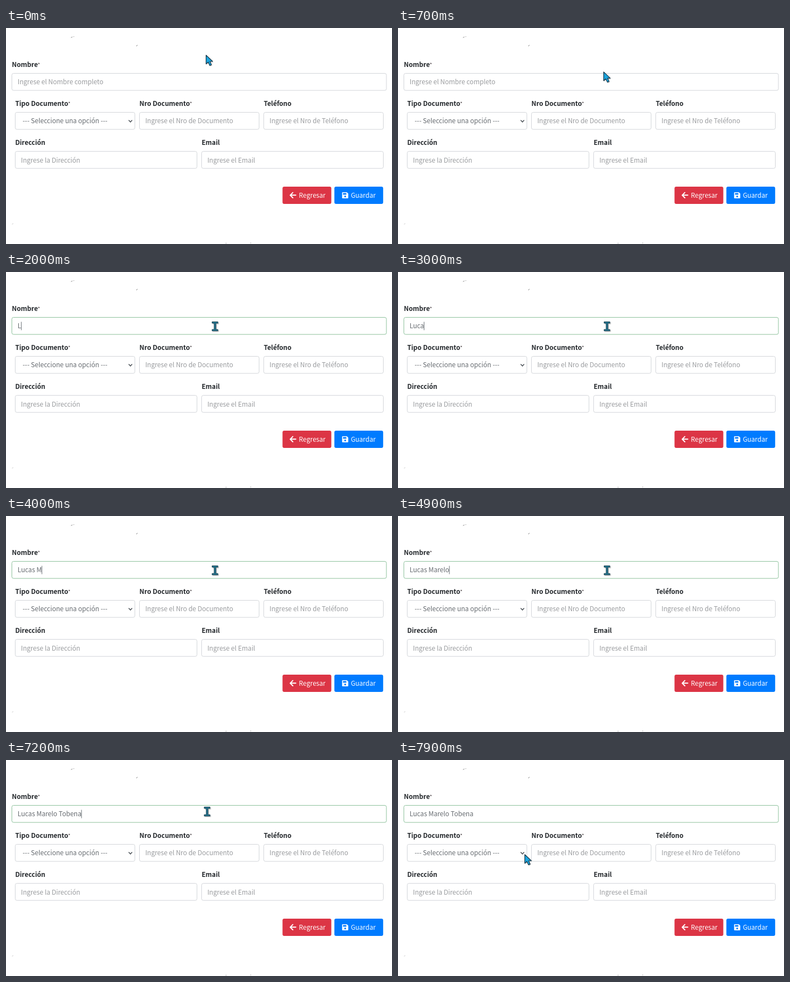
Recreate the animation shown at these times as an HTML page. Size 690 px wide and 388 px high, loop 8000 ms.

```html
<!DOCTYPE html>
<html lang="es">
<head>
<meta charset="utf-8">
<title>Formulario</title>
<style>
  html, body { margin: 0; width: 100%; height: 100%; overflow: hidden; background: #fff; }
  svg { display: block; width: 690px; height: 388px; }
  text { font: 400 11.65px "Noto Sans CJK JP", "Noto Sans CJK SC", "Noto Sans CJK", "Noto Sans", sans-serif; fill: #999b9e; white-space: pre; }
  .label { font-weight: 700; fill: #24282c; }
  .star { font-size: 7px; fill: #4a4245; }
  .value { fill: #666b70; }
  .button { font-weight: 500; fill: #fff; }
  .box { fill: #fff; stroke: #d3d6da; }
  .box.focused { fill: #fbfeff; stroke: #a9d0e8; }
  .box.valid { fill: #fff; stroke: #8fc29d; }
</style>
</head>
<body>
<svg id="stage" viewBox="0 0 690 388" xmlns="http://www.w3.org/2000/svg">
  <path d="M117 17.2l1.2-1.2M233.4 32.2l1.2-1.2" stroke="#555" stroke-linecap="round"/>
  <path d="M121 15.5h.6M11.5 352.3l.8-.8M393 386.5h.8M437 386h.8" stroke="#aaa" stroke-linecap="round"/>
  <g id="form"></g>

  <path d="M219.3 165.6l3.1 3.2 3.1-3.2" fill="none" stroke="#50565c" stroke-width="1.5"/>
  <text id="typed" class="value" x="20.8" y="101.4"></text>
  <path id="caret" d="M0 89.5V104.5" stroke="#6a7076"/>

  <path d="M518 300.3H508.5M512.7 295.6l-4.7 4.7 4.7 4.7" fill="none" stroke="#fff" stroke-width="1.9" stroke-linecap="round" stroke-linejoin="round"/>
  <path d="M602 295h7.2l2.6 2.6v7.2q0 1.2-1.2 1.2h-8.6q-1.2 0-1.2-1.2v-8.6q0-1.2 1.2-1.2z" fill="#fff"/>
  <path d="M602.4 296.5h6v2.9h-6z" fill="#007bff"/>
  <circle cx="606.3" cy="302.7" r="1.6" fill="#007bff"/>

  <g id="arrow" stroke-linejoin="round">
    <path d="M1.6 2V18.5L5.4 15 8.4 21 11.6 19.4 8.8 13.8H14z" fill="#555" opacity=".3"/>
    <path d="M.6 .8V16.6L4.4 13.2 7.3 19.4 10.3 18 7.5 12H12.4z" fill="#1ba5de" stroke="#1b3a4b" stroke-width="1.2"/>
  </g>
  <g id="beam" stroke-linejoin="round">
    <path d="M-4 -7H7V-3.6H3.4V6.6H7V10H-4V6.6H-.4V-3.6H-4z" fill="#555" opacity=".3"/>
    <path d="M-5.2 -8.2H5.2V-5.6H1.5V5.6H5.2V8.2H-5.2V5.6H-1.5V-5.6H-5.2z" fill="#1f7590" stroke="#1d4252" stroke-width="1"/>
  </g>
</svg>
<script>
const LOOP = 8000, STEP = 100, FOCUS = 900, BLINK = 500;
const LEFT = 16.5, WIDTH = 658, GAP = 8.3, HEIGHT = 30.6;

// each word is typed at its own steady pace
const WORDS = [
  { text: "Lucas ", start: 1700, pace: 360 },
  { text: "Marelo ", start: 3900, pace: 200 },
  { text: "Tobena", start: 5700, pace: 275 }
];
const NAME = WORDS.map(w => w.text).join("");
const KEYS = WORDS.flatMap(w => [...w.text].map((_, i) => w.start + i * w.pace));

const HOME = { x: 357, y: 48 };
const MOVES = [
  { start: 300, end: 1000, x: 373.6, y: 97.6 },
  { start: 7000, end: 7200, x: 359.5, y: 92.6 },
  { start: 7300, end: 7900, x: 226, y: 169 }
];

const $ = id => document.getElementById(id);
const ease = k => k * k * (3 - 2 * k);
const clamp = k => Math.min(1, Math.max(0, k));

function add(tag, attrs, text = "", parent = $("form")) {
  const el = document.createElementNS("http://www.w3.org/2000/svg", tag);
  for (const key in attrs) el.setAttribute(key, attrs[key]);
  el.textContent = text;
  return parent.appendChild(el);
}

function field(x, y, width, { label, hint, required, select }) {
  const title = add("text", { class: "label", x, y: y - 12 }, label);
  if (required) add("tspan", { class: "star", dy: -2 }, "*", title);
  const box = add("rect", { class: "box", x, y, width, height: HEIGHT, rx: 3 });
  const text = add("text", { class: select ? "value" : "", x: x + (select ? 13.3 : 10.3), y: y + 19.9 }, hint);
  return { box, text };
}

function row(y, fields) {
  const w = (WIDTH - GAP * (fields.length - 1)) / fields.length;
  fields.forEach((f, i) => field(LEFT + i * (w + GAP), y, w, f));
}

function button(x, color, label, textX) {
  add("rect", { x, y: 285, width: 87.2, height: 31, rx: 3, fill: color });
  add("text", { class: "button", x: textX, y: 304.8 }, label);
}

const name = field(10.5, 81.5, WIDTH + 11.5,
  { label: "Nombre", hint: "Ingrese el Nombre completo", required: true });
row(151.5, [
  { label: "Tipo Documento", hint: "--- Seleccione una opción ---", required: true, select: true },
  { label: "Nro Documento", hint: "Ingrese el Nro de Documento", required: true },
  { label: "Teléfono", hint: "Ingrese el Nro de Teléfono" }
]);
row(221.6, [
  { label: "Dirección", hint: "Ingrese la Dirección" },
  { label: "Email", hint: "Ingrese el Email" }
]);
button(494.3, "#dc3545", "Regresar", 523.6);
button(587, "#007bff", "Guardar", 616.4);

function pointer(t) {
  return MOVES.reduce((p, m) => {
    const k = ease(clamp((t - m.start) / (m.end - m.start)));
    return { x: p.x + (m.x - p.x) * k, y: p.y + (m.y - p.y) * k };
  }, HOME);
}

function place(id, shown, x, y) {
  $(id).setAttribute("visibility", shown ? "visible" : "hidden");
  $(id).setAttribute("transform", `translate(${x} ${y})`);
}

function draw(ms) {
  const t = Math.floor(ms / STEP) * STEP;
  const count = KEYS.filter(k => k <= t).length;
  const focused = t >= FOCUS;

  const typed = $("typed");
  typed.textContent = NAME.slice(0, count);
  name.text.setAttribute("visibility", count ? "hidden" : "visible");
  name.box.classList.toggle("focused", focused);
  name.box.classList.toggle("valid", count > 0);

  const since = t - (count ? KEYS[count - 1] : FOCUS);
  const width = count ? typed.getComputedTextLength() : 0;
  place("caret", focused && since % (2 * BLINK) < BLINK, 21 + width, 0);

  const { x, y } = pointer(t);
  const inField = y > 81 && y < 112;
  place("arrow", !inField, x, y);
  place("beam", inField, x, y);
}

function tick() {
  draw(performance.now() % LOOP);
  requestAnimationFrame(tick);
}
tick();
</script>
</body>
</html>
```
